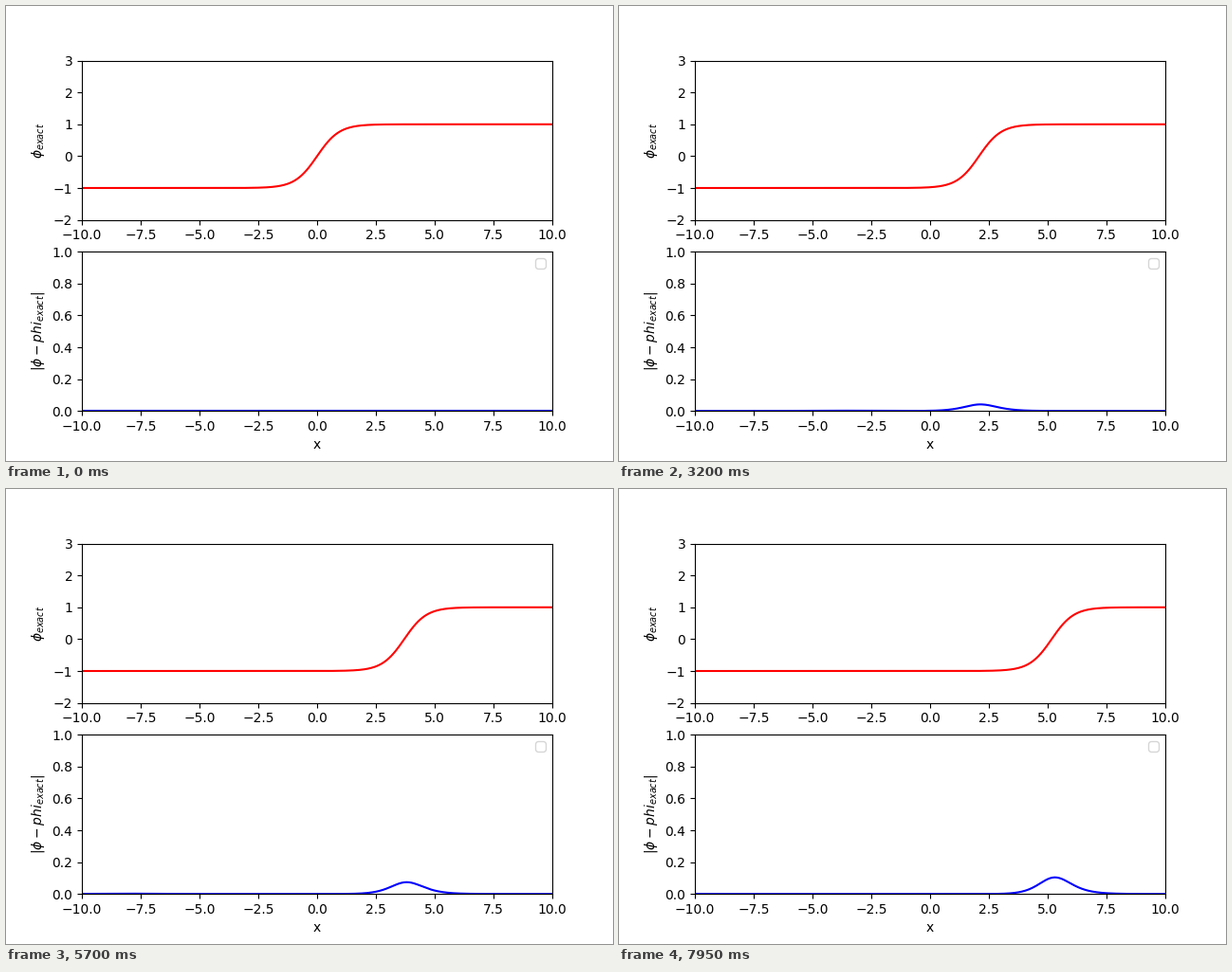
These frames come from a looping animation (640 by 480 pixels, 8 s). A matplotlib script:

```python
import numpy as np
import matplotlib.pyplot as plt
from matplotlib.animation import FuncAnimation

FRAMES = 160
STEP = 0.0325    # kink travel per frame
K = 1.06         # inverse kink width
PERIOD = 51.5    # shape-mode period in frames

x = np.linspace(-10, 10, 401)


def kink(n):
    return np.tanh(K * (x - STEP * n))


def error(n):
    u = K * (x - STEP * n)
    sech = 1 / np.cosh(u)
    wobble = 0.009 * np.cos(2 * np.pi * (n - 40) / PERIOD)
    skew = 0.00022 * n + wobble * (1 - np.exp(-n / 8))
    wake = 0.002 * min(n / 30, 1) * np.exp(-((x + 0.08 * n - 1) / 2) ** 2)
    shift = 0.00064 * n * sech ** 2
    return np.abs(shift + skew * np.tanh(u) * sech ** 1.5 + wake)


fig, (top, bottom) = plt.subplots(2, 1, figsize=(6.4, 4.8), dpi=100)
exact_line, = top.plot(x, kink(0), "r")
error_line, = bottom.plot(x, error(0), "b")

top.set(xlim=(-10, 10), ylim=(-2, 3), ylabel=r"$\phi_{exact}$")
top.set_yticks(range(-2, 4))
bottom.set(xlim=(-10, 10), ylim=(0, 1), xlabel="x",
           ylabel=r"$|\phi - phi_{exact}|$")
bottom.legend([], [], loc="upper right")
fig.align_ylabels()


def update(n):
    exact_line.set_ydata(kink(n))
    error_line.set_ydata(error(n))
    return exact_line, error_line


anim = FuncAnimation(fig, update, frames=FRAMES, interval=50,
                     repeat=True, repeat_delay=0, blit=False)
plt.show()
```
